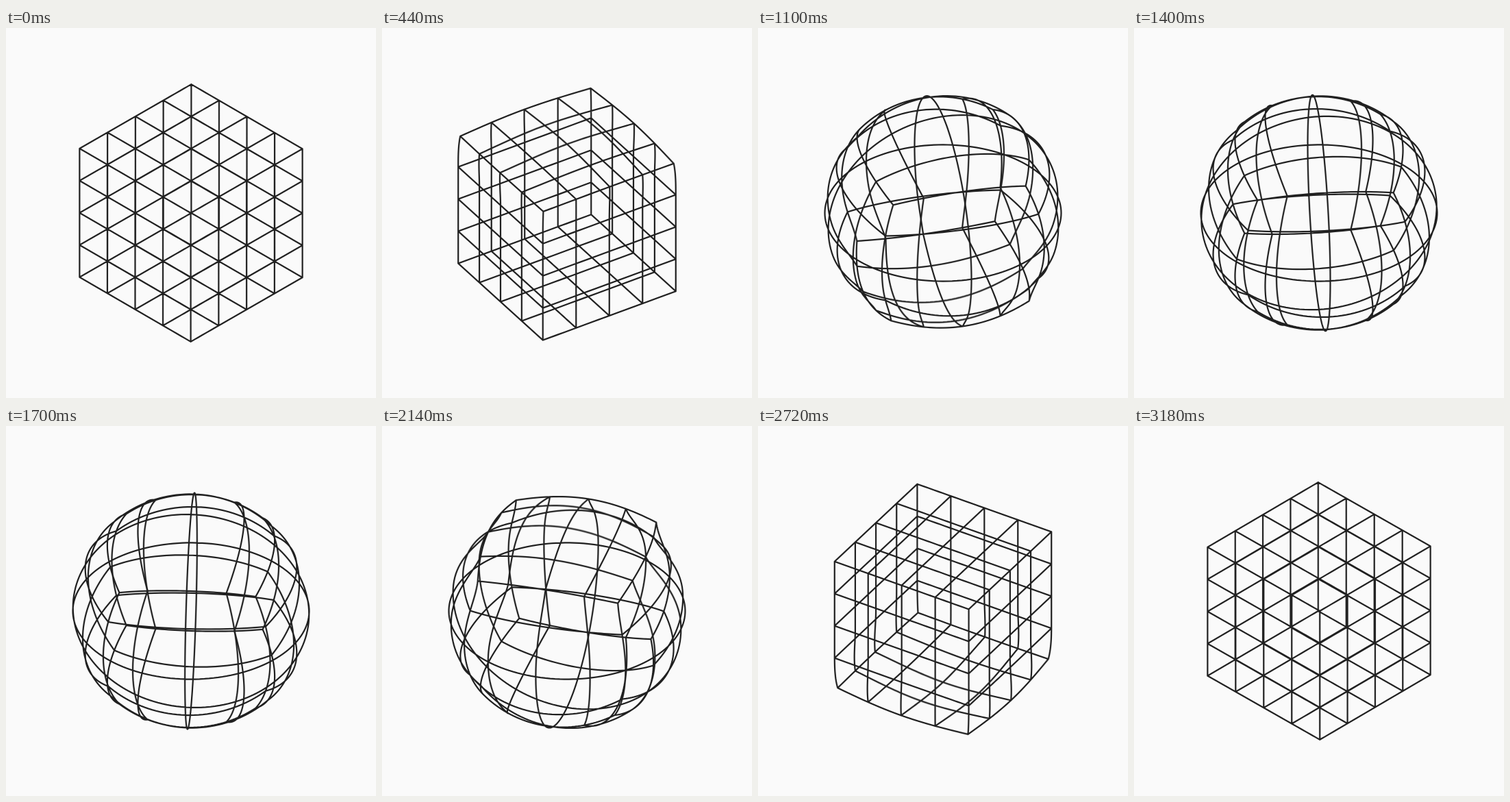
Write an HTML page with a canvas that moves like this. It is 540 by 540 pixels and loops after 3200 ms.

```html
<!DOCTYPE html>
<html lang="en">
<head>
<meta charset="utf-8">
<title>Cube and sphere</title>
<style>
  html, body { margin: 0; width: 100%; height: 100%; overflow: hidden; background: #fafafa; }
  canvas { display: block; width: 540px; height: 540px; }
</style>
</head>
<body>
<canvas id="stage" width="540" height="540"></canvas>
<script>
const SIZE = 540, MID = SIZE / 2;
const LOOP = 3200, HALF = LOOP / 2, STEP = 20;
const EDGE = 115, RADIUS = 172.5;      // half cube edge, sphere radius
const MORPH = 480, LAG = 228;          // duration of the morph, delay per unit of height
const SAMPLES = 5, SHUTTER = 0.6;      // motion blur
const TILT = Math.atan(Math.SQRT1_2);
const COS = Math.cos(TILT), SIN = Math.sin(TILT);

const view = document.getElementById('stage').getContext('2d');
const layer = document.createElement('canvas');
layer.width = layer.height = SIZE;
const pen = layer.getContext('2d');

// Square loops around the cube, five planes across each axis.
function makeLoops() {
  const corners = [[-1, -1], [1, -1], [1, 1], [-1, 1]];
  const parts = 48, loops = [];
  for (let axis = 0; axis < 3; axis++) {
    for (let k = -1; k <= 1; k += 0.5) {
      const loop = [];
      corners.forEach(([u, v], i) => {
        const [u2, v2] = corners[(i + 1) % 4];
        for (let j = 0; j < parts; j++) {
          const f = j / parts, p = [];
          p[axis] = k;
          p[(axis + 1) % 3] = u + (u2 - u) * f;
          p[(axis + 2) % 3] = v + (v2 - v) * f;
          loop.push(p);
        }
      });
      loops.push(loop);
    }
  }
  return loops;
}
const loops = makeLoops();

const smooth = p => {
  p = Math.min(1, Math.max(0, p));
  return p * p * (3 - 2 * p);
};

// 0 is cube, 1 is sphere; both changes sweep from top to bottom.
function roundness(height, t) {
  const m = smooth(0.5 + (t % HALF - HALF / 2 + LAG * height) / MORPH);
  return t < HALF ? m : 1 - m;
}

function drawWire(t) {
  const angle = Math.PI / 4 + Math.PI / 2 * t / LOOP;
  const ca = Math.cos(angle), sa = Math.sin(angle);
  pen.fillStyle = '#fafafa';
  pen.fillRect(0, 0, SIZE, SIZE);
  pen.beginPath();
  for (const loop of loops) {
    loop.forEach(([x, y, z], i) => {
      const m = roundness(y, t);
      const s = EDGE * (1 - m) + RADIUS * m / Math.hypot(x, y, z);
      const depth = x * sa + z * ca;
      const px = MID + s * (x * ca - z * sa);
      const py = MID - s * (y * COS - depth * SIN);
      if (i) pen.lineTo(px, py);
      else pen.moveTo(px, py);
    });
    pen.closePath();
  }
  pen.lineWidth = 2.2;
  pen.lineJoin = 'round';
  pen.strokeStyle = '#202020';
  pen.stroke();
}

function render(now) {
  const t = Math.floor((now % LOOP) / STEP) * STEP;
  for (let k = 0; k < SAMPLES; k++) {
    drawWire(t + k * STEP * SHUTTER / SAMPLES);
    view.globalAlpha = 1 / (k + 1);    // running average
    view.drawImage(layer, 0, 0);
  }
}

function tick() {
  render(performance.now());
  requestAnimationFrame(tick);
}
tick();
</script>
</body>
</html>
```
